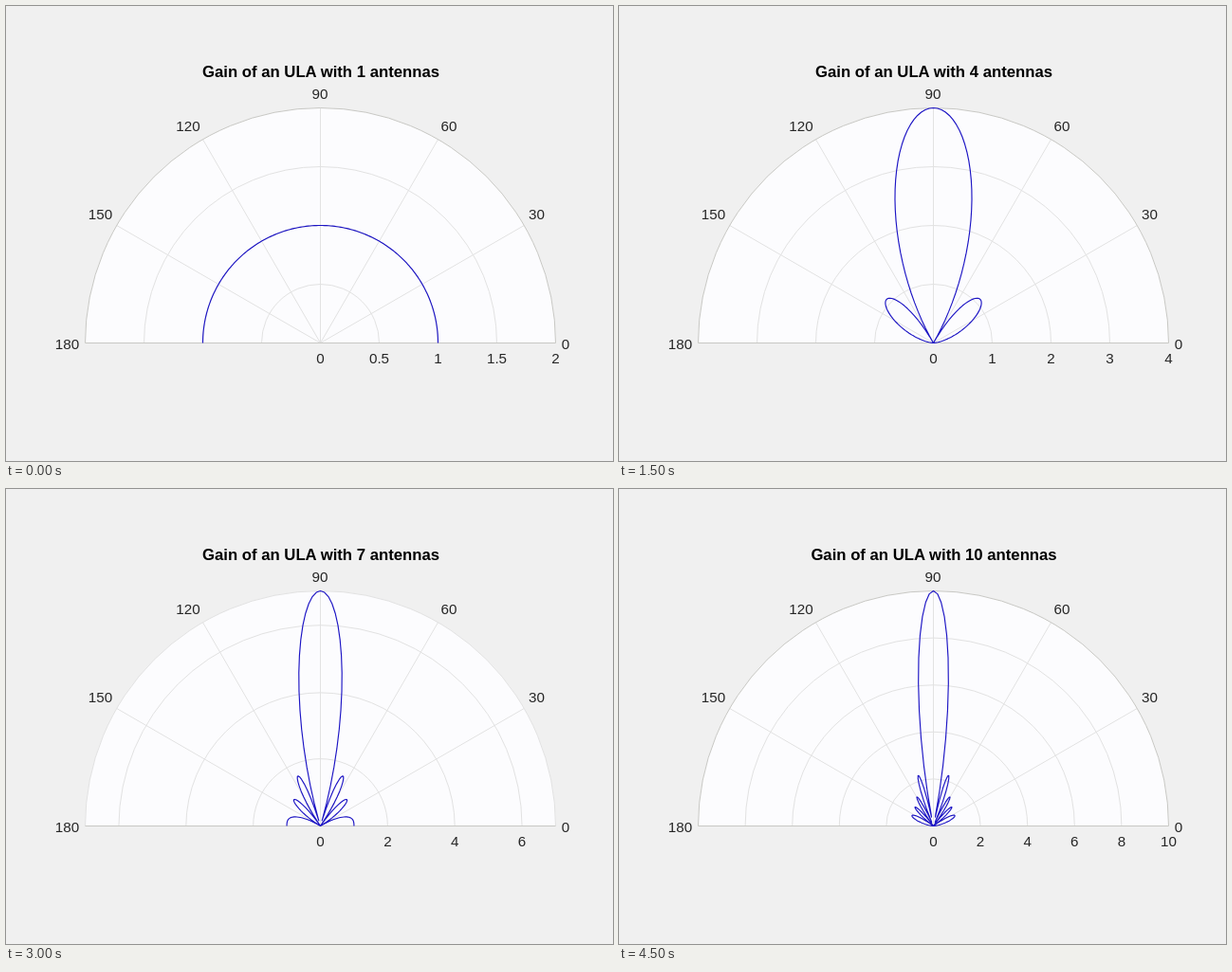
An HTML page that plays this animation: 640 px wide and 480 px high, repeating every 5 s.

```html
<!DOCTYPE html>
<html lang="en">
<head>
<meta charset="utf-8">
<title>Gain of a uniform linear array</title>
<style>
  html, body { margin: 0; width: 100%; height: 100%; overflow: hidden; background: #f0f0f0; }
  svg { display: block; width: 640px; height: 480px; }
  text { font: 15.2px "Liberation Sans", Arial, sans-serif; fill: #262626; text-anchor: middle; }
  .title { font-size: 16.72px; font-weight: bold; fill: #000; }
  path { fill: none; stroke-width: 1; }
  .disc { fill: #fcfcfe; }
  .grid { stroke: #e2e2e2; }
  .edge { stroke: #c8c8c4; }
  .gain { stroke: #1c14c4; stroke-width: 1.15; stroke-linejoin: round; }
</style>
</head>
<body>
<svg id="stage" viewBox="0 0 640 480"></svg>
<script>
const CX = 331.5, CY = 355.5, R = 248;
const STEP_MS = 500, MAX_ANTENNAS = 10;
const stage = document.getElementById("stage");

const point = (r, deg) => {
  const a = deg * Math.PI / 180;
  return `${(CX + r * Math.cos(a)).toFixed(2)} ${(CY - r * Math.sin(a)).toFixed(2)}`;
};
const path = (cls, d) => `<path class="${cls}" d="${d}"/>`;
const label = (x, y, s, cls = "") => `<text class="${cls}" x="${x}" y="${y}">${s}</text>`;
const arc = r => `M${point(r, 180)}A${r} ${r} 0 0 1 ${point(r, 0)}`;

// Array factor for half-wavelength spacing
function gain(n, deg) {
  const half = Math.PI / 2 * Math.cos(deg * Math.PI / 180);
  return Math.abs(half) < 1e-9 ? n : Math.abs(Math.sin(n * half) / Math.sin(half));
}

function draw(n) {
  const rMax = Math.max(n, 2);
  const tick = n < 3 ? 0.5 : n < 6 ? 1 : 2;
  const scale = R / rMax;
  let out = path("disc", arc(R) + "Z");

  for (let deg = 30; deg < 180; deg += 30) out += path("grid", `M${CX} ${CY}L${point(R, deg)}`);
  for (let v = tick; v < rMax; v += tick) out += path("grid", arc(v * scale));
  out += path(rMax % tick ? "grid" : "edge", arc(R));
  out += path("edge", `M${point(R, 180)}L${point(R, 0)}`);

  // One-degree sampling leaves the narrow nulls slightly open
  const curve = Array.from({ length: 181 }, (_, deg) => point(gain(n, deg) * scale, deg));
  out += path("gain", "M" + curve.join("L"));

  for (let v = 0; v <= rMax; v += tick) out += label(CX + v * scale, 377, v);
  const angles = [[590, 361.5], [559.5, 225], [467, 132], [331, 98], [192, 132], [99.5, 225], [64.5, 361.5]];
  angles.forEach(([x, y], i) => out += label(x, y, i * 30));
  out += label(332, 75, `Gain of an ULA with ${n} antennas`, "title");
  stage.innerHTML = out;
}

let shown = 0;
const start = performance.now();
function frame() {
  const n = Math.floor((performance.now() - start) / STEP_MS) % MAX_ANTENNAS + 1;
  if (n !== shown) draw(shown = n);
  requestAnimationFrame(frame);
}
frame();
</script>
</body>
</html>
```
